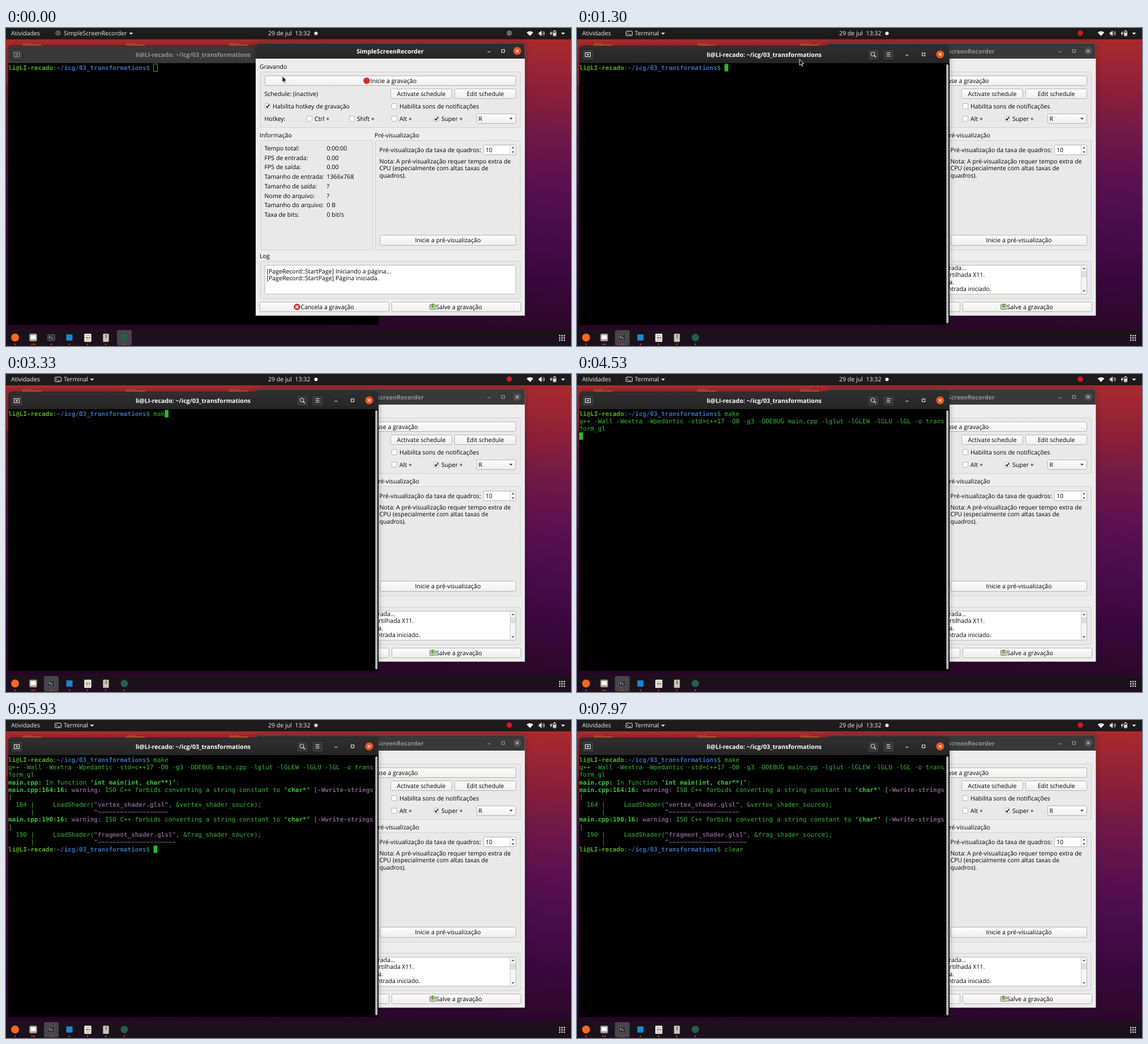
These frames come from a looping animation (998x561 px, 8000 ms). An HTML page with a canvas:

```html
<!DOCTYPE html>
<html lang="pt-BR">
<head>
<meta charset="utf-8">
<title>Desktop</title>
<style>
html, body { margin: 0; width: 100%; height: 100%; overflow: hidden; background: #000; }
canvas { display: block; width: 998px; height: 561px; }
</style>
</head>
<body>
<canvas id="stage"></canvas>
<script>
const W = 998, H = 561, LOOP = 8000;
const canvas = document.getElementById('stage');
const dpr = window.devicePixelRatio || 1;
canvas.width = W * dpr;
canvas.height = H * dpr;
const c = canvas.getContext('2d');
c.scale(dpr, dpr);
c.textRendering = 'geometricPrecision';

const SANS = '"Open Sans", "Noto Sans", sans-serif';
const MONO = '"DejaVu Sans Mono", monospace';
const USER = 'li@LI-recado', DIR = '~/icg/03_transformations';

// Moments in ms
const RECORD = 260, FOCUS = 1200, ENTER = 4250, WARN = 5250, DONE = 5500;
const MAKE_KEYS = [3000, 3150, 3290, 3480];
const CLEAR_KEYS = [6650, 6800, 6920, 7060, 7200];
const WAKES = [FOCUS, ...MAKE_KEYS, ENTER, ...CLEAR_KEYS];

// Drawing helpers
function rect(x, y, w, h, fill) {
  c.fillStyle = fill;
  c.fillRect(x, y, w, h);
}
function box(x, y, w, h, r, fill, stroke) {
  c.beginPath();
  c.roundRect(x, y, w, h, r);
  if (fill) { c.fillStyle = fill; c.fill(); }
  if (stroke) { c.strokeStyle = stroke; c.lineWidth = 1; c.stroke(); }
}
function disc(x, y, r, fill) {
  c.beginPath();
  c.arc(x, y, r, 0, 7);
  c.fillStyle = fill;
  c.fill();
}
function line(pts, color, width = 1) {
  c.beginPath();
  for (let i = 0; i < pts.length; i += 2) c.lineTo(pts[i], pts[i + 1]);
  c.strokeStyle = color;
  c.lineWidth = width;
  c.stroke();
}
function poly(pts, fill, stroke) {
  c.beginPath();
  for (let i = 0; i < pts.length; i += 2) c.lineTo(pts[i], pts[i + 1]);
  c.closePath();
  c.fillStyle = fill;
  c.fill();
  if (stroke) { c.strokeStyle = stroke; c.lineWidth = 1; c.stroke(); }
}
function text(s, x, y, color = '#000', align = 'left', weight = 400) {
  c.font = `${weight} 10.6px ${SANS}`;
  c.textAlign = align;
  c.fillStyle = color;
  c.fillText(s, x, y + 3.8);
}
function vertical(y0, y1, ...colors) {
  const g = c.createLinearGradient(0, y0, 0, y1);
  colors.forEach((k, i) => g.addColorStop(i / (colors.length - 1), k));
  return g;
}
function triangle(x, y, size, color, dir = 1) {
  poly([x - size, y - dir * size / 2, x + size, y - dir * size / 2, x, y + dir * size / 2], color);
}
function cross(x, y, r, color, width = 1.2) {
  line([x - r, y - r, x + r, y + r], color, width);
  line([x + r, y - r, x - r, y + r], color, width);
}
function shadow(blur) {
  c.shadowColor = blur ? 'rgba(0,0,0,.35)' : 'transparent';
  c.shadowBlur = blur;
}

// Desktop
function wallpaper() {
  rect(0, 0, W, H, vertical(20, 532, '#a92a2d', '#8f2038', '#701848', '#5a1050', '#490b4a', '#38083b', '#2b082b'));
  const g = c.createLinearGradient(0, 0, W, 0);
  g.addColorStop(0, 'rgba(25,5,25,.25)');
  g.addColorStop(1, 'rgba(20,5,20,0)');
  rect(0, 100, W, H, g);
  for (const x of [45, 228, 410]) {
    box(x - 16, 26, 18, 7, 2, '#a5442d');
    box(x - 16, 29, 34, 8, 2, '#cc5931');
  }
}

function topBar(focused, recording) {
  rect(0, 0, W, 20, '#1d1b1c');
  const ink = '#f0f0f0';
  text('Atividades', 9, 9.5, ink);
  if (focused) {
    box(86.5, 5.5, 11, 8, 1, null, ink);
    line([88.5, 7.5, 90.5, 9.5, 88.5, 11.5], ink);
    line([92, 11.5, 95, 11.5], ink);
    text('Terminal', 102, 9.5, ink);
    triangle(152, 10, 3.5, ink);
  } else {
    disc(92, 9, 5, '#4d5657');
    text('SimpleScreenRecorder', 102, 9.5, ink);
    triangle(221, 10, 3.5, ink);
  }
  text('29 de jul  13:32', 463, 9.5, ink);
  disc(547.5, 9.5, 3, '#fff');
  disc(889, 9, 4.8, recording ? '#d31624' : '#686868');
  // Wireless, sound and battery
  c.beginPath();
  c.moveTo(925.5, 14);
  c.arc(925.5, 14, 8.3, -2.35, -.79);
  c.fillStyle = '#fff';
  c.fill();
  poly([941, 7.5, 943, 7.5, 946, 4.5, 946, 14.5, 943, 11.5, 941, 11.5], '#fff');
  for (const r of [2.5, 5]) {
    c.beginPath();
    c.arc(946, 9.5, r, -.9, .9);
    c.strokeStyle = '#fff';
    c.lineWidth = 1;
    c.stroke();
  }
  poly([963.5, 5, 960.5, 10, 962.5, 10, 961.5, 14, 965, 8.5, 963, 8.5], '#fff');
  box(966.5, 5.5, 5, 8.5, 1, null, '#fff');
  rect(968, 4, 2, 1.5, '#fff');
  rect(967.5, 8, 3, 5, '#fff');
  triangle(984, 10, 3.5, '#fff');
}

function dock(focused) {
  rect(0, 532, W, 29, '#1c111b');
  box(focused ? 67 : 196, 533, 26, 27, 3, '#49434a');
  disc(16, 546, 7, '#f16a24');
  box(41.5, 539.5, 13, 13, 2, '#aaa69e', '#77736d');
  rect(43.5, 542, 9, 7, '#fff');
  box(73.5, 540.5, 13, 11, 1.5, '#36383a', '#57595b');
  line([76, 543.5, 78, 545, 76, 546.5], '#ddd');
  line([79, 547, 82, 547], '#ddd');
  box(106.5, 540.5, 11, 11, 1, '#1688d4');
  box(138.5, 539.5, 12, 14, 1, '#ececec', '#aaa');
  rect(141, 542, 7, 1, '#999');
  rect(141, 545, 4, 3, '#e87442');
  rect(146, 545, 3, 3, '#6c9bd0');
  rect(141, 550, 7, 1, '#999');
  box(171.5, 539.5, 10, 14, 1, '#c9c5b8', '#8a877c');
  rect(176, 541, 1.5, 6, '#555');
  disc(209, 546, 6.5, '#24604a');
  for (const x of [16, 46, 50, 80, 112, 144, 176, 209]) disc(x, 558, 1.2, '#e95420');
  for (let i = 0; i < 9; i++) rect(977 + i % 3 * 4, 541.5 + Math.floor(i / 3) * 4, 2.3, 2.3, '#e8e8e8');
}

// Recorder window
function button(x, y, w, h, label, labelX) {
  box(x + .5, y + .5, w - 1, h - 1, 2, vertical(y, y + h, '#fdfdfd', '#eeeeee'), '#b7b4b0');
  if (labelX) text(label, labelX, y + h / 2);
  else text(label, x + w / 2, y + h / 2, '#000', 'center');
}
function group(x, y, w, h, label) {
  text(label, x - 1, y - 9);
  c.setLineDash([1, 1]);
  box(x + .5, y + .5, w - 1, h - 1, 2, '#e9e9e9', '#b9b9bd');
  c.setLineDash([]);
}
function check(x, y, label, on) {
  box(x + .5, y - 4.5, 9, 9, 1, '#fff', '#b5b2ae');
  if (on) line([x + 2.5, y, x + 4.5, y + 2.5, x + 8, y - 3], '#111', 1.6);
  text(label, x + 14, y);
}
function windowButtons(x, y, gap, active) {
  const ink = active ? '#fff' : '#a5a5a5';
  line([x - 2 * gap - 2.5, y + 1.5, x - 2 * gap + 2.5, y + 1.5], ink);
  c.strokeStyle = ink;
  c.strokeRect(x - gap - 2.5, y - 2.5, 5, 5);
  disc(x, y, 7, active ? '#e95420' : '#505050');
  cross(x, y, 2.4, active ? '#fff' : '#c8c8c8');
}
function logPanel(recording) {
  rect(457, 418, 444, 52, '#fff');
  c.save();
  c.beginPath();
  c.rect(458, 419, 432, 50);
  c.clip();
  const rows = recording ? [
    '[PageRecord::StartInput] Iniciando a entrada...',
    '[X11Input::Init] Usando memória compartilhada X11.',
    '[PageRecord::StartInput] Entrada iniciada.',
    '[X11Input::InputThread] Segmento de entrada iniciado.'
  ] : [
    '[PageRecord::StartPage] Iniciando a página...',
    '[PageRecord::StartPage] Página iniciada.'
  ];
  rows.forEach((s, i) => text(s, 460.5, (recording ? 423 : 429) + i * 12.35));
  c.restore();
  if (recording) {
    rect(890, 419, 10, 50, '#f5f5f5');
    rect(890, 419, 1, 50, '#c9c9c9');
    rect(891, 429, 9, 11, '#dedede');
    triangle(895.5, 424, 2.5, '#444', -1);
    triangle(895.5, 464, 2.5, '#444');
  }
  box(457.5, 418.5, 443, 51, 1, null, '#bcb9b3');
}
function recorder(active, recording) {
  shadow(10);
  box(441, 26.5, 475.5, 481, [6, 6, 0, 0], '#ededed');
  shadow(0);
  box(441, 26.5, 475.5, 27.5, [6, 6, 0, 0], active ? vertical(27, 54, '#302f2f', '#272626') : '#3a3939');
  text('SimpleScreenRecorder', 678.5, 41, active ? '#fff' : '#929292', 'center', 700);
  windowButtons(903, 40.5, 25, active);

  group(449, 77, 460, 99, 'Gravando');
  button(457, 84, 444, 18, recording ? 'Pause a gravação' : 'Inicie a gravação', recording ? 642 : 643.5);
  if (recording) {
    box(631.5, 88.5, 3.5, 9, 0, '#c3c3c3', '#858585');
    box(637, 88.5, 3.5, 9, 0, '#c3c3c3', '#858585');
  } else disc(637, 93, 5.8, '#cb3028');
  text('Schedule: (inactive)', 456.5, 116);
  button(679, 107, 109, 18, 'Activate schedule');
  button(792, 107, 109, 18, 'Edit schedule');
  check(457, 138, 'Habilita hotkey de gravação', true);
  check(681, 138, 'Habilita sons de notificações');
  text('Hotkey:', 456.5, 160);
  check(531, 160, 'Ctrl +');
  check(606, 160, 'Shift +');
  check(681, 160, 'Alt +');
  check(755, 160, 'Super +', true);
  button(831, 151, 70, 18, 'R', 834.5);
  triangle(892, 160, 3, '#333');

  group(449, 198, 199, 194, 'Informação');
  const info = [
    ['Tempo total:', '0:00:00'], ['FPS de entrada:', '0.00'], ['FPS de saída:', '0.00'],
    ['Tamanho de entrada:', '1366x768'],
    ['Tamanho de saída:', recording ? '1366x768' : '?'],
    ['Nome do arquivo:', recording ? 'make-…3.mp4' : '?'],
    ['Tamanho do arquivo:', '0 B'], ['Taxa de bits:', '0 bit/s']
  ];
  info.forEach(([name, value], i) => {
    text(name, 456.5, 212 + i * 16.75);
    text(value, 566.5, 212 + i * 16.75);
  });

  group(652, 198, 257, 194, 'Pré-visualização');
  text('Pré-visualização da taxa de quadros:', 659.5, 215);
  box(843.5, 206.5, 57, 17, 2, '#fff', '#b7b4b0');
  rect(890, 207, 1, 16, '#c9c6c2');
  text('10', 847, 215);
  triangle(895.5, 211, 2.5, '#333', -1);
  triangle(895.5, 219, 2.5, '#333');
  ['Nota: A pré-visualização requer tempo extra de', 'CPU (especialmente com altas taxas de', 'quadros).']
    .forEach((s, i) => text(s, 659.5, 235 + i * 12.4));
  button(660, 365, 241, 19, 'Inicie a pré-visualização');

  group(449, 411, 460, 67, 'Log');
  logPanel(recording);
  button(448, 483, 229, 18, 'Cancela a gravação', 520.5);
  disc(514, 492, 5.8, '#cc3438');
  cross(514, 492, 2.4, '#fff', 1.6);
  button(681, 483, 229, 18, 'Salve a gravação', 759.5);
  box(748.5, 487.5, 10, 9, 1, '#c9cbc6', '#7d807a');
  poly([752, 486, 755, 486, 755, 490, 757, 490, 753.5, 494, 750, 490, 752, 490], '#68ad2c');
}

// Terminal window
const CELL = 6.58, ROW = 13.17;
const INK = {
  t: ['#34ba34', 400], b: ['#38c838', 700], u: ['#5dac20', 700],
  p: ['#3a6fb2', 700], w: ['#805988', 700]
};
// Runs alternate between a style key and its text.
function row(n, ...runs) {
  let col = 0;
  c.textAlign = 'left';
  for (let i = 0; i < runs.length; i += 2) {
    const [color, weight] = INK[runs[i]];
    c.font = `${weight} 10.93px ${MONO}`;
    c.fillStyle = color;
    for (const ch of runs[i + 1]) c.fillText(ch, 4 + CELL * col++, 74 + n * ROW);
  }
  return col;
}
function prompt(n, typed) {
  return row(n, 'u', USER, 't', ':', 'p', DIR, 't', '$ ' + typed);
}
function warning(n, at, file, arg) {
  row(n, 'b', `main.cpp:${at}:16: `, 'w', 'warning: ', 't', 'ISO C++ forbids converting a string constant to ',
    'b', '‘char*’', 't', ' [', 'w', '-Wwrite-strings');
  row(n + 1, 't', ']');
  row(n + 2, 't', `  ${at} |     LoadShader(`, 'w', `"${file}"`, 't', `, &${arg});`);
  row(n + 3, 't', '      |' + ' '.repeat(16), 'w', '^' + '~'.repeat(file.length + 1));
}
function typed(word, keys, t) {
  return word.slice(0, keys.filter(k => k <= t).length);
}
function screen(t, focused) {
  let line = 0, col = prompt(0, typed('make', MAKE_KEYS, t));
  if (t >= ENTER) {
    row(1, 't', 'g++ -Wall -Wextra -Wpedantic -std=c++17 -O0 -g3 -DDEBUG main.cpp -lglut -lGLEW -lGLU -lGL -o trans');
    row(2, 't', 'form_gl');
    line = 3;
    col = 0;
  }
  if (t >= WARN) {
    row(3, 'b', 'main.cpp:', 't', ' In function ', 'b', '‘int main(int, char**)’', 't', ':');
    warning(4, 164, 'vertex_shader.glsl', 'vertex_shader_source');
    warning(8, 190, 'fragment_shader.glsl', 'frag_shader_source');
    line = 12;
  }
  if (t >= DONE) col = prompt(12, typed('clear', CLEAR_KEYS, t));

  const x = 4 + col * CELL, y = 63.4 + line * ROW;
  if (!focused) {
    c.strokeStyle = '#2fae2f';
    c.lineWidth = 1;
    c.strokeRect(260.5, 63.5, 7, 13);
  } else {
    const last = Math.max(...WAKES.filter(k => k <= t));
    if ((t - last) % 1200 < 600) rect(x, y, CELL, ROW, '#22bf22');
  }
}
function terminal(t, focused) {
  shadow(10);
  box(4, 31.5, 654, 492, [6, 6, 0, 0], '#000');
  shadow(0);
  box(4, 31.5, 654, 30.5, [6, 6, 0, 0], focused ? vertical(32, 62, '#302f2f', '#262525') : '#3a3939');
  const ink = focused ? '#eee' : '#9b9b9b';
  text(`${USER}: ${DIR}`, 330.5, 47, focused ? '#fff' : '#929292', 'center', 700);
  const face = focused ? '#3a3939' : '#403f3f';
  for (const x of [9, 513, 540]) box(x + .5, 37.5, 20, 19, 3, face, '#222');
  c.strokeStyle = ink;
  c.lineWidth = 1;
  c.strokeRect(14.5, 43.5, 9, 7);
  line([17, 47, 21, 47], ink);
  line([19, 45, 19, 49], ink);
  c.beginPath();
  c.arc(522.5, 46, 3.4, 0, 7);
  c.stroke();
  line([525, 48.5, 528, 51.5], ink, 1.4);
  for (let i = 0; i < 3; i++) line([547, 43.5 + i * 3, 553.5, 43.5 + i * 3], ink);
  windowButtons(641.5, 46.5, 29.3, focused);
  screen(t, focused);
  if (focused) box(652.3, 64, 4, 457, 2, '#b8b8b8');
}

// Pointer
function ease(t, from, to) {
  const k = Math.min(1, Math.max(0, (t - from) / (to - from)));
  return k * k * (3 - 2 * k);
}
function pointer(t, focused) {
  if (t >= MAKE_KEYS[0]) return;
  const a = ease(t, 330, 850), b = ease(t, 1300, 1850);
  const x = 488 - 95 * a + 29.5 * b, y = 85 - 30 * a + 141 * b;
  if (focused && y > 62) {
    const shape = [[-3, -6, -.5, -5], [3, -6, .5, -5], [0, -5, 0, 5], [-3, 6, -.5, 5], [3, 6, .5, 5]];
    for (const [color, width] of [['#777', 2.6], ['#fff', 1.2]])
      for (const s of shape) line(s.map((v, i) => v + (i % 2 ? y : x)), color, width);
  } else {
    const arrow = [0, 0, 0, 11, 2.6, 8.7, 4.3, 12.5, 6, 11.7, 4.4, 8, 7.8, 7.8];
    poly(arrow.map((v, i) => v + (i % 2 ? y : x)), '#111', '#e6e6e6');
  }
}

function draw(t) {
  const focused = t >= FOCUS, recording = t >= RECORD;
  wallpaper();
  if (focused) {
    recorder(false, recording);
    terminal(t, true);
  } else {
    terminal(t, false);
    recorder(true, recording);
  }
  topBar(focused, recording);
  dock(focused);
  pointer(t, focused);
}
const start = performance.now();
function tick() {
  draw((performance.now() - start) % LOOP);
  requestAnimationFrame(tick);
}
tick();
</script>
</body>
</html>
```
